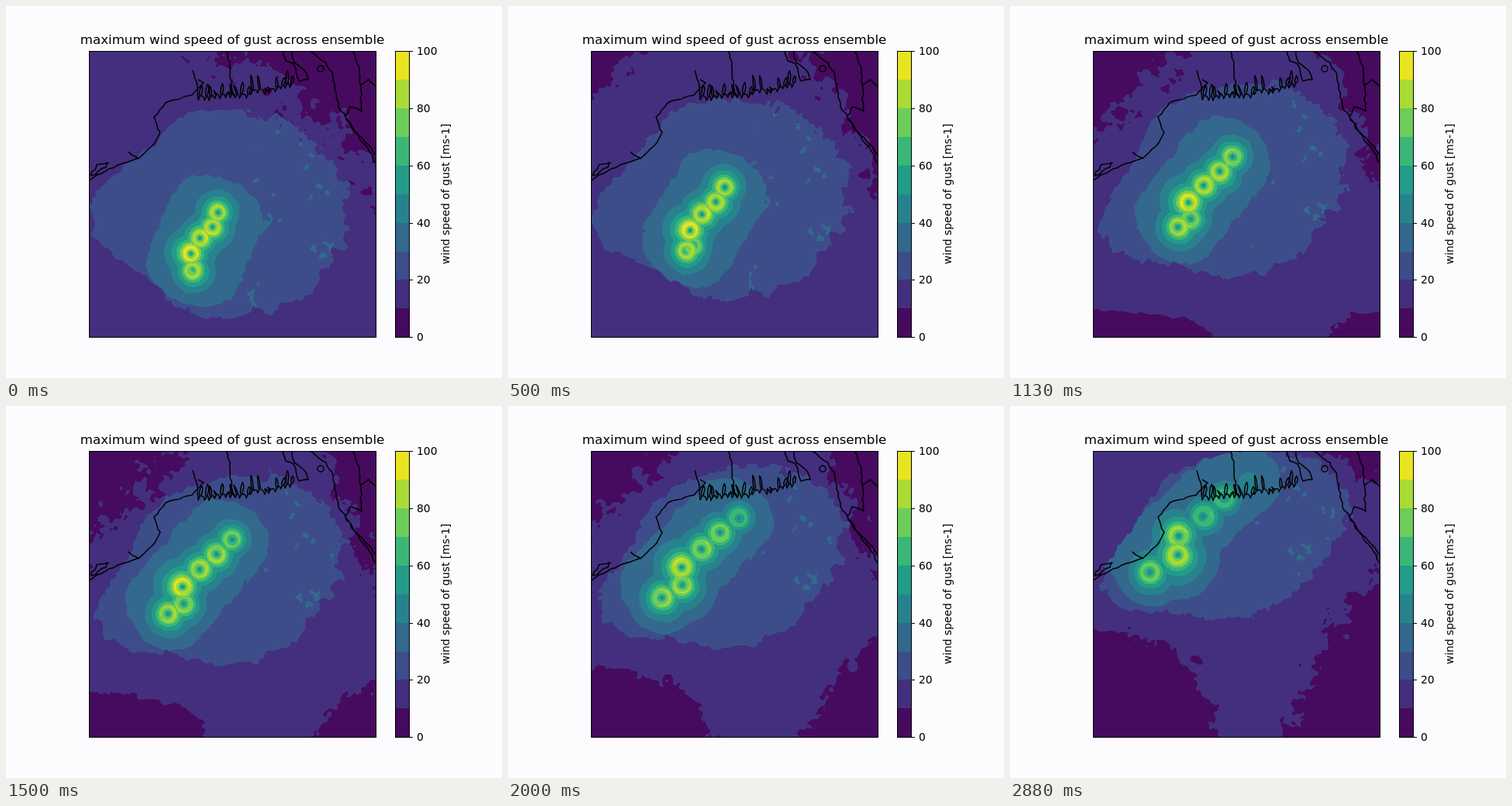
An HTML page with a canvas for the animation above (3010 ms loop, 640 px wide and 480 px high).

```html
<!DOCTYPE html>
<html lang="en">
<head>
<meta charset="utf-8">
<title>Wind gust ensemble</title>
<style>
html, body { margin: 0; width: 100%; height: 100%; overflow: hidden; background: #fcfcfe; }
canvas { display: block; width: 640px; height: 480px; }
</style>
</head>
<body>
<canvas id="stage" width="640" height="480"></canvas>
<script>
const ctx = document.getElementById('stage').getContext('2d');
const LOOP = 3010, STEPS = 24, LEFT = 108, TOP = 58, SIZE = 370;
const COLORS = ['#460b5e', '#432f7e', '#3d4d8a', '#32698d', '#28828d',
                '#229c88', '#3ab677', '#6ccd5a', '#a9da35', '#e8e41f'];
const RGB = COLORS.map(c => [1, 3, 5].map(i => parseInt(c.slice(i, i + 2), 16)));

// Ensemble members, south to north: x, y and peak speed at both ends of the loop.
const EYES = [
  { from: [240, 341, 89], to: [180, 214, 77] },
  { from: [243, 338, 80], to: [216, 192, 89] },
  { from: [238, 319, 98], to: [217, 167, 83] },
  { from: [250, 299, 92], to: [249, 142, 70] },
  { from: [266, 285, 91], to: [276, 118, 66] },
  { from: [273, 266, 88], to: [308, 99, 46] }
];

const lerp = (a, b, t) => a + (b - a) * t;
const clamp = t => Math.max(0, Math.min(1, t));

function random(seed) {
  return () => (seed = (Math.imul(seed, 1664525) + 1013904223) >>> 0) / 4294967296;
}
const rnd = random(41);
const grid = Float32Array.from({ length: 4096 }, () => rnd() * 2 - 1);

function smoothNoise(x, y) {
  const xi = Math.floor(x), yi = Math.floor(y);
  let u = x - xi, v = y - yi;
  u *= u * (3 - 2 * u);
  v *= v * (3 - 2 * v);
  const at = (i, j) => grid[(i & 63) + (j & 63) * 64];
  return lerp(lerp(at(xi, yi), at(xi + 1, yi), u),
              lerp(at(xi, yi + 1), at(xi + 1, yi + 1), u), v);
}

// Two octaves, turned against each other to hide the lattice.
function roughness(x, y) {
  return smoothNoise((x * .8 + y * .6) / 14, (y * .8 - x * .6) / 14) * .65
       + smoothNoise((x * .5 - y * .87) / 5, (y * .5 + x * .87) / 5) * .35;
}

function eyeAt({ from, to }, p) {
  return {
    x: lerp(from[0], to[0], p),
    y: lerp(from[1], to[1], p) - 7 * Math.sin(Math.PI * p),
    peak: lerp(from[2], to[2], p * p)
  };
}

function eyeSpeed(eye, radius, lean, x, y) {
  const dx = x - eye.x, dy = y - eye.y, d = Math.hypot(dx, dy) || 1;
  const side = (dx * Math.cos(lean) + dy * Math.sin(lean)) / d;
  const peak = eye.peak * (.975 + .03 * side);
  return d < radius ? peak - (peak - 42) * (1 - d / radius) ** 1.6
                    : peak * (radius / d) ** .65;
}

// Below 1 inside the wide wind field: a tilting ellipse, pinched on its west half.
function galeField(p) {
  const cy = lerp(268, 172, p), tilt = -.42 * clamp(p * 2.5);
  const c = Math.cos(tilt), s = Math.sin(tilt), width = lerp(135, 104, p);
  return (x, y) => {
    const dx = x - 273, dy = y - cy;
    const u = (dx * c + dy * s) / 167, v = (dy * c - dx * s) / width;
    const rr = u * u + v * v;
    const pinch = u < 0 ? .18 * (2 * u * v / rr) ** 2 : 0;
    return Math.sqrt(rr) / (1 - pinch);
  };
}

// Below 1 inside the inner field: a capsule around the line of eyes.
function stormField(first, last, p) {
  const dx = last.x - first.x, dy = last.y - first.y, length = Math.hypot(dx, dy);
  const ux = dx / length, uy = dy / length, eastWidth = lerp(62, 40, p);
  return (x, y) => {
    const along = (x - first.x) * ux + (y - first.y) * uy;
    const across = (y - first.y) * ux - (x - first.x) * uy;
    const beyond = Math.max(-along, along - length, 0);
    return Math.hypot(beyond / 43, across / (across > 0 ? eastWidth : 62));
  };
}

// Calm air spreading from the corners of the map.
function calmCorners(p) {
  const q = clamp((p - .2) / .8), bulge = Math.sin(Math.PI * p);
  return [
    { x: 108, y: 427, rx: 155, ry: 140 * q, power: 2.4, rough: .3 },
    { x: 477, y: 427, rx: 60 + 60 * q, ry: 215 * q ** 1.2, power: 1.2, rough: .3 },
    { x: 108, y: 58, rx: 125 * bulge, ry: 125 * bulge, power: .9, rough: .5 },
    { x: 477, y: 58, rx: 75 + 110 * (1 - p) ** 8, ry: 155 * (1 - .7 * p ** 6), power: 1, rough: .5 }
  ].filter(c => c.rx > 2 && c.ry > 2);
}

function renderField(step) {
  const layer = document.createElement('canvas');
  layer.width = layer.height = SIZE;
  const g = layer.getContext('2d'), image = g.createImageData(SIZE, SIZE);
  const p = step / (STEPS - 1), radius = lerp(8.8, 11.3, p);
  const eyes = EYES.map(eye => eyeAt(eye, p));
  const gale = galeField(p), storm = stormField(eyes[0], eyes[5], p);
  const corners = calmCorners(p);

  function speedAt(x, y) {
    const rough = roughness(x + step * 1.5, y + step * 5.5);
    const east = x > 310;
    if (gale(x, y) + rough * (east ? .1 : .06) < 1) {
      let speed = east && rough > .55 ? 35 : 25;
      if (storm(x, y) + rough * .09 < 1) speed = 35;
      eyes.forEach((eye, i) => {
        const s = eyeSpeed(eye, radius, i * 2, x, y) * (1 + rough * .03);
        if (s > 31) speed = Math.max(speed, s);
      });
      return speed;
    }
    const calm = corners.some(c => (Math.abs(x - c.x) / c.rx) ** c.power
      + (Math.abs(y - c.y) / c.ry) ** c.power + rough * c.rough < 1);
    return calm ? 5 : 15;
  }

  for (let i = 0; i < SIZE * SIZE; i++) {
    const speed = speedAt(LEFT + i % SIZE, TOP + Math.floor(i / SIZE));
    image.data.set(RGB[Math.min(9, Math.floor(speed / 10))], i * 4);
    image.data[i * 4 + 3] = 255;
  }
  g.putImageData(image, 0, 0);
  return layer;
}

// Shorelines: a few key points, roughened between them.
const coast = new Path2D(), jitter = random(12);
function shore(...points) {
  coast.moveTo(points[0], points[1]);
  for (let i = 2; i < points.length; i += 2) {
    const [x0, y0, x1, y1] = points.slice(i - 2, i + 2);
    const parts = Math.ceil(Math.hypot(x1 - x0, y1 - y0) / 6);
    for (let j = 1; j <= parts; j++) {
      const wander = j < parts ? 2.4 : 0;
      coast.lineTo(lerp(x0, x1, j / parts) + (jitter() - .5) * wander,
                   lerp(y0, y1, j / parts) + (jitter() - .5) * wander);
    }
  }
}
shore(108, 225, 133, 210, 172, 196, 188, 181, 199, 163, 191, 143, 206, 125, 240, 115, 255, 99, 248, 95);
shore(109, 219, 117, 205, 132, 202, 129, 208, 109, 219);
shore(158, 188, 172, 197);
shore(241, 83, 247, 104);
shore(284, 58, 289, 72, 291, 108, 296, 118);
shore(357, 58, 361, 71, 371, 75, 378, 97, 390, 95, 384, 82, 372, 73, 369, 58);
shore(392, 58, 413, 73, 422, 90, 429, 130, 448, 158, 469, 188, 477, 203);
shore(447, 58, 456, 80, 459, 136, 444, 130, 438, 142, 448, 160, 466, 178, 477, 192);
shore(457, 103, 468, 95, 477, 104);
coast.moveTo(410, 81);
coast.arc(406, 81, 4, 0, Math.PI * 2);

// River mouths: narrow inlets of uneven depth along the delta.
coast.moveTo(247, 104);
for (let x = 248; x < 368; x += 5 + jitter() * 5) {
  const bottom = 122 - Math.max(0, x - 295) * .2 - jitter() * 4;
  const top = bottom - 7 - jitter() * 20, lean = jitter() * 7 - 3;
  coast.quadraticCurveTo(x - 1, bottom - 6, x, bottom);
  coast.lineTo(x + 2, bottom - 4);
  coast.quadraticCurveTo(x, lerp(bottom, top, .6), x + 1 + lean, top);
  coast.quadraticCurveTo(x + 4 + lean, top + 3, x + 3.5, bottom - 5);
}

function text(str, x, y, size, align) {
  ctx.font = `${size}px "DejaVu Sans", sans-serif`;
  ctx.textAlign = align;
  ctx.fillStyle = '#000';
  ctx.fillText(str, x, y);
}

function drawColorbar() {
  const yOf = speed => Math.round(427.4 - speed * 3.696);
  COLORS.forEach((color, i) => {
    ctx.fillStyle = color;
    ctx.fillRect(502, yOf(i * 10 + 10), 19, yOf(i * 10) - yOf(i * 10 + 10));
  });
  ctx.strokeRect(502.5, 58.5, 18, 369);
  for (let speed = 0; speed <= 100; speed += 20) {
    ctx.fillStyle = '#000';
    ctx.fillRect(521, yOf(speed), 4, 1);
    text(String(speed), 530, yOf(speed) + 5, 13.89, 'left');
  }
  ctx.save();
  ctx.translate(572, 242.5);
  ctx.rotate(-Math.PI / 2);
  text('wind speed of gust [ms-1]', 0, 0, 13.89, 'center');
  ctx.restore();
}

const fields = [];
function draw(step) {
  ctx.fillStyle = '#fcfcfe';
  ctx.fillRect(0, 0, 640, 480);
  text('maximum wind speed of gust across ensemble', 292, 49, 16.67, 'center');
  fields[step] ||= renderField(step);
  ctx.drawImage(fields[step], LEFT, TOP);

  ctx.strokeStyle = '#000';
  ctx.save();
  ctx.beginPath();
  ctx.rect(LEFT, TOP, SIZE, SIZE);
  ctx.clip();
  ctx.lineWidth = 1.5;
  ctx.lineJoin = 'round';
  ctx.stroke(coast);
  ctx.restore();
  ctx.lineWidth = 1;
  ctx.strokeRect(107.5, 58.5, 370, 369);
  drawColorbar();
}

// Steps last 125 ms, with starts rounded up to 10 ms.
function stepAt(t) {
  const step = Math.min(STEPS - 1, Math.floor(t / 125));
  return Math.ceil(step * 12.5) * 10 > t ? step - 1 : step;
}

const start = performance.now();
let shown = -1;
function tick() {
  const step = stepAt((performance.now() - start) % LOOP);
  if (step !== shown) draw(shown = step);
  requestAnimationFrame(tick);
}
tick();
</script>
</body>
</html>
```
